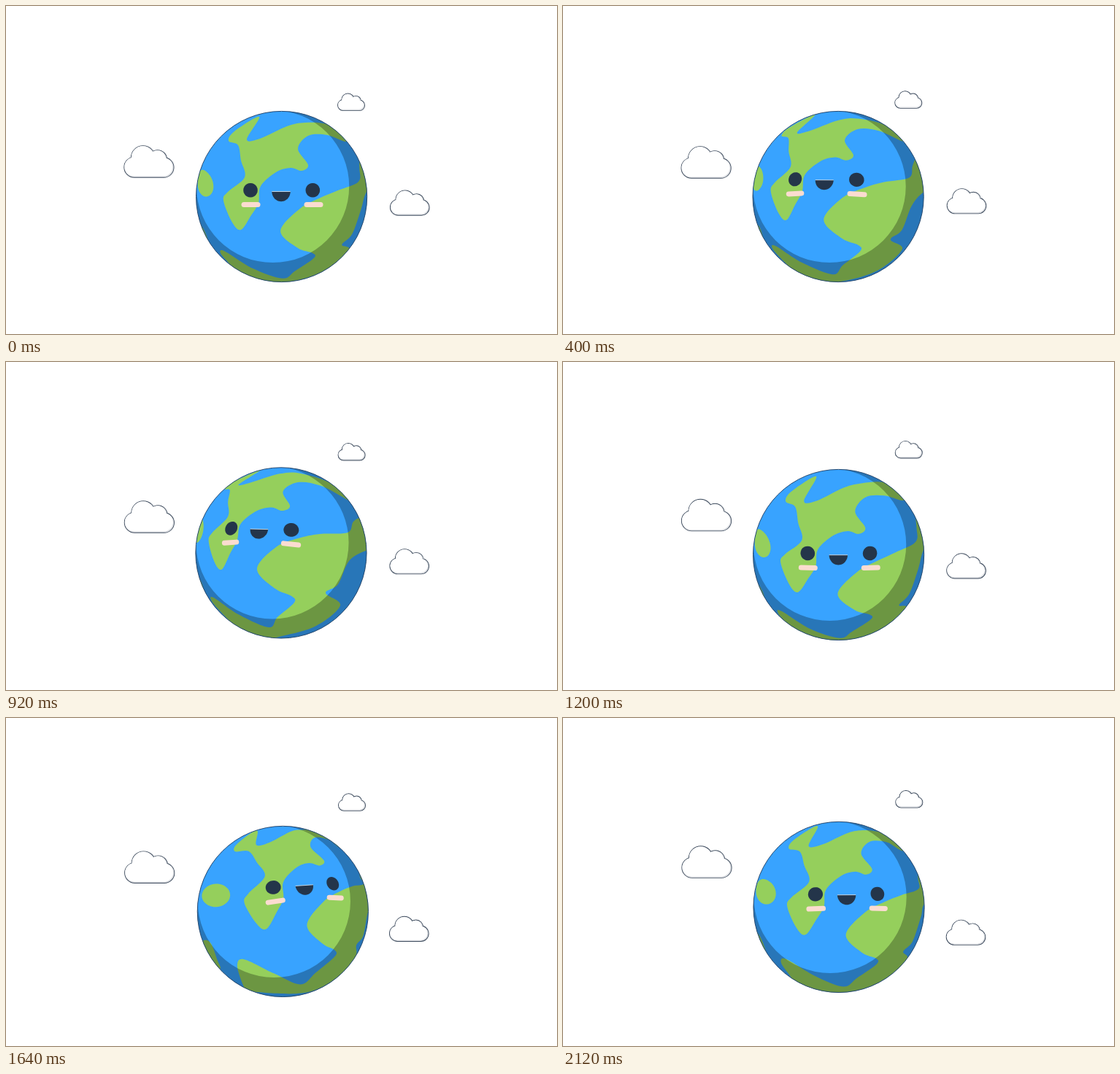
Recreate the animation shown at these times as an HTML page with a canvas. Size 755 by 450 pixels, loop 2.16 s.

```html
<!DOCTYPE html>
<html lang="en">
<head>
<meta charset="utf-8">
<title>Happy globe</title>
<style>
  html, body { margin: 0; width: 100%; height: 100%; overflow: hidden; background: #fff; }
  canvas { display: block; }
</style>
</head>
<body>
<canvas id="stage" width="755" height="450"></canvas>
<script>
const ctx = document.getElementById('stage').getContext('2d');
const LOOP = 2160, STEP = 40, R = 117.2;
const { sin, cos, abs, sqrt, hypot, exp, min, max, PI } = Math;

// Each cloud floats on its own slow cosine
const CLOUDS = [
  { x: 195.8, drift: .0005, scale: 1, y: 197.5, swing: 17, speed: .0009, peak: 380 },
  { x: 553.2, drift: -.0006, scale: .79, y: 281, swing: -13.3, speed: .00175, peak: 350 },
  { x: 473, drift: .0006, scale: .55, y: 121.3, swing: 13.7, speed: .0008, peak: -863 }
];
const PUFFS = [[-20, 7.7, 14.5], [20.5, 8, 14.2], [-8, -5.3, 17], [12, -3, 13.3]];

// Smooth rise from 0 to 1 between two times
function rise(t, from, to) {
  const k = min(1, max(0, (t - from) / (to - from)));
  return k * k * (3 - 2 * k);
}

// Look left, swing right with a nod, then come back
function pose(t) {
  const yaw = -.28 * rise(t, 0, 720) + .58 * rise(t, 910, 1500) - .3 * rise(t, 1820, 2305);
  const nod = exp(-(((t - 1200) / 170) ** 2));
  const u = yaw / .28;
  return {
    yaw,
    pitch: abs(yaw) * (.9 - .5 * abs(yaw)) - .065 * nod,
    roll: u * (.1 * abs(u) + .015 * u),
    cx: 377.6 + 4 * yaw + 6 * yaw * yaw,
    cy: 261.5 + 4.7 * rise(t, 800, 1480) - 7.7 * rise(t, 1480, 2300)
  };
}

const turn = (a, b, angle) => [a * cos(angle) + b * sin(angle), b * cos(angle) - a * sin(angle)];

// Sphere to stage; points on the far side land outside the rim
function project([x, y, z], p) {
  [x, z] = turn(x, z, p.yaw);
  [z, y] = turn(z, y, p.pitch);
  [x, y] = turn(x, y, p.roll);
  const r = hypot(x, y), k = z < 0 ? (2 - r) / r : 1;
  return [p.cx + x * k * R, p.cy + y * k * R];
}

// Stage to sphere, for a shape drawn as it looks at time t
function lift(points, t) {
  const p = pose(t);
  return points.map(([px, py]) => {
    let x = (px - p.cx) / R, y = (py - p.cy) / R;
    const r = hypot(x, y);
    if (r > 1) {
      x *= (2 - r) / r;
      y *= (2 - r) / r;
    }
    let z = sqrt(max(0, 1 - x * x - y * y)) * (r > 1 ? -1 : 1);
    [x, y] = turn(x, y, -p.roll);
    [z, y] = turn(z, y, -p.pitch);
    [x, z] = turn(x, z, -p.yaw);
    return [x, y, z];
  });
}

const arc = (x, y, rx, ry, turns = 1, n = 24) => Array.from({ length: n + 1 }, (_, i) => {
  const a = 2 * PI * turns * i / n;
  return [x + rx * cos(a), y + ry * sin(a)];
});

const LANDS = [
  // North, with the long cape under the left eye
  lift([
    [347, 152], [313, 172], [305, 185], [318, 191], [322, 212], [327, 235], [304, 255], [298, 267],
    [310, 297], [322, 307], [336, 287], [346, 270], [349, 247], [370, 228], [390, 222], [405, 226],
    [414, 218], [400, 196], [414, 178], [440, 177], [466, 186], [475, 176], [440, 162], [410, 160],
    [385, 165], [348, 182], [330, 183]
  ], 0),
  // East, joined to the southern strip
  lift([
    [490, 213], [476, 219], [468, 234], [430, 236], [400, 242], [370, 254], [344, 284], [369, 311],
    [391, 321], [395, 330], [372, 350], [360, 364], [318, 346], [284, 323], [284, 331], [312, 361],
    [335, 383], [378, 376], [425, 362], [458, 334], [438, 317], [455, 305], [470, 273], [493, 259],
    [516, 256], [516, 218]
  ], 920),
  // Western islands
  lift(arc(287, 244.5, 19, 16, 11 / 12, 11), 1440),
  lift([[268, 306], [279, 309], [288, 332], [291, 344], [258, 330]], 1440)
];
const EYES = [335, 420.3].map(x => lift(arc(x, 252.7, 9.8, 9.8), 0));
const MOUTH = lift(arc(377, 254.5, 12.7, 13.7, .5), 0);
const CHEEKS = [326, 412].map(x => lift([[x, 272.6], [x + 19, 272.6]], 0));

function polyline(points) {
  ctx.beginPath();
  points.forEach(([x, y]) => ctx.lineTo(x, y));
}

function smoothLoop(pts) {
  const n = pts.length, at = i => pts[(i + n) % n];
  ctx.beginPath();
  ctx.moveTo(...pts[0]);
  for (let i = 0; i < n; i++) {
    const a = at(i - 1), b = at(i), c = at(i + 1), d = at(i + 2);
    ctx.bezierCurveTo(
      b[0] + (c[0] - a[0]) / 6, b[1] + (c[1] - a[1]) / 6,
      c[0] - (d[0] - b[0]) / 6, c[1] - (d[1] - b[1]) / 6, c[0], c[1]);
  }
  ctx.closePath();
}

function disc(x, y, r) {
  ctx.moveTo(x + r, y);
  ctx.arc(x, y, r, 0, 2 * PI);
}

function puff(color, inset, shift) {
  ctx.fillStyle = color;
  ctx.beginPath();
  PUFFS.forEach(([x, y, r]) => disc(x - shift, y - shift, r - inset));
  ctx.rect(-20 - shift, -4 - shift, 40.5, 26.2 - inset);
  ctx.fill();
}

function drawCloud(c, t) {
  const px = 1 / c.scale;
  ctx.save();
  ctx.translate(c.x + c.drift * t, c.y + c.swing * cos(c.speed * (t - c.peak)));
  ctx.scale(c.scale, c.scale);
  puff('#3c4a5c', 0, 0);
  puff('#dcdee2', .9 * px, 0);
  puff('#fff', 1.7 * px, .6 * px);
  ctx.restore();
}

function drawFace(p) {
  const flat = shape => shape.map(v => project(v, p));
  ctx.fillStyle = '#24354a';
  [...EYES, MOUTH].forEach(shape => {
    polyline(flat(shape));
    ctx.closePath();
    ctx.fill();
  });
  // Light lip
  ctx.strokeStyle = 'rgba(255,255,255,.7)';
  ctx.lineWidth = 1;
  polyline([MOUTH[0], MOUTH[MOUTH.length - 1]].map(v => project(v, p)));
  ctx.stroke();

  ctx.strokeStyle = '#fbdcd0';
  ctx.lineWidth = 7;
  ctx.lineCap = 'round';
  CHEEKS.forEach(shape => {
    polyline(flat(shape));
    ctx.stroke();
  });
  ctx.lineCap = 'butt';
}

function drawGlobe(p) {
  ctx.save();
  ctx.beginPath();
  disc(p.cx, p.cy, R);
  ctx.clip();
  ctx.fillStyle = '#38a3ff';
  ctx.fill();
  ctx.fillStyle = '#95cf5c';
  LANDS.forEach(land => {
    smoothLoop(land.map(v => project(v, p)));
    ctx.fill();
  });
  // Crescent shade
  ctx.beginPath();
  ctx.rect(p.cx - 130, p.cy - 130, 260, 260);
  disc(p.cx - 12, p.cy - 14, 104.6);
  ctx.fillStyle = 'rgba(0,0,0,.28)';
  ctx.fill('evenodd');
  ctx.restore();

  ctx.beginPath();
  disc(p.cx, p.cy, R - .1);
  ctx.strokeStyle = '#25486f';
  ctx.lineWidth = 1;
  ctx.stroke();
  drawFace(p);
}

function frame(now) {
  const t = Math.floor(now % LOOP / STEP) * STEP;
  ctx.fillStyle = '#fff';
  ctx.fillRect(0, 0, 755, 450);
  CLOUDS.forEach(c => drawCloud(c, t));
  drawGlobe(pose(t));
  requestAnimationFrame(frame);
}
frame(0);
</script>
</body>
</html>
```
